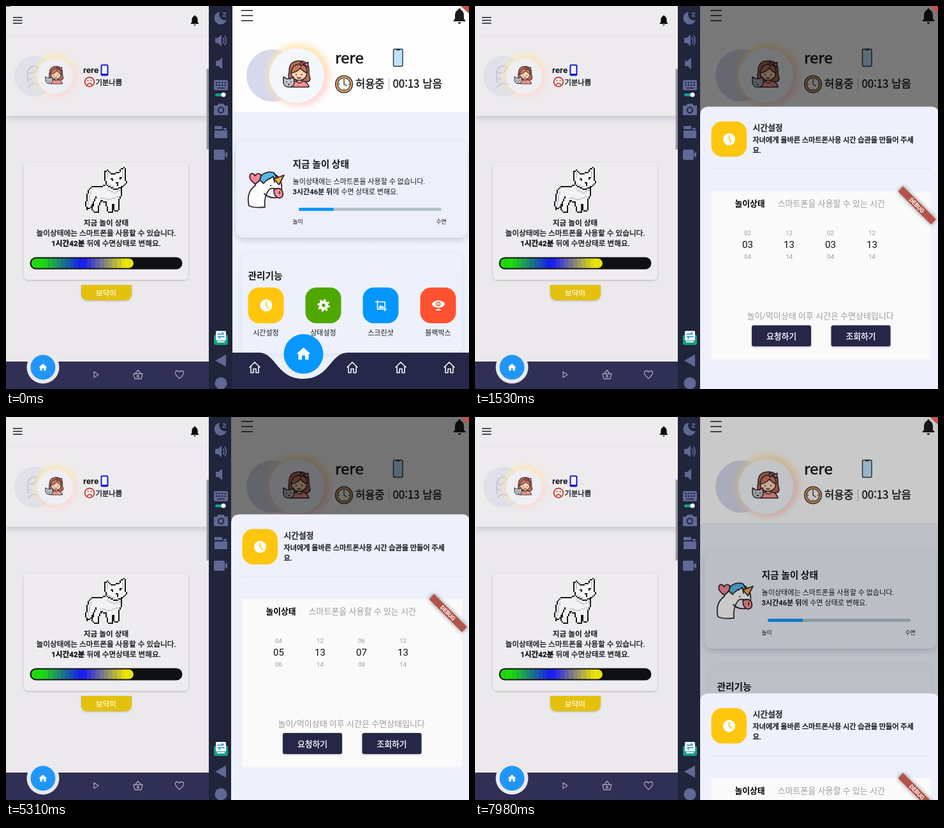
Write an HTML page that moves like this. It is 726 by 600 pixels and loops after 8 s.

```html
<!DOCTYPE html>
<html lang="ko">
<head>
<meta charset="utf-8">
<title>놀이 시간 설정</title>
<style>
html, body { margin: 0; width: 100%; height: 100%; overflow: hidden; background: #ebe9ec; }
svg { display: block; width: 726px; height: 600px; }
text { font-family: Roboto, "Noto Sans CJK KR", "Noto Sans CJK", sans-serif; fill: #16171b; }
.kr { font-family: "Noto Sans CJK KR", "Noto Sans CJK", sans-serif; }
.b { font-weight: 700; }
/* medium weight: regular with a thin outline */
.m { stroke: #16171b; stroke-width: .35; }
.c { text-anchor: middle; }
.w { fill: #fff; stroke: #fff; }
.g { fill: #9d9da1; }
.ln { fill: none; stroke-linecap: round; stroke-linejoin: round; }
.ink { stroke: #33252d; stroke-width: 1.5; stroke-linejoin: round; stroke-linecap: round; }
</style>
</head>
<body>
<svg viewBox="0 0 726 600">
<defs>
  <filter id="blur" x="-40%" y="-40%" width="180%" height="180%"><feGaussianBlur stdDeviation="5"/></filter>
  <filter id="soft" x="-20%" y="-20%" width="140%" height="150%"><feDropShadow dx="0" dy="4" stdDeviation="5" flood-color="#3c4468" flood-opacity=".22"/></filter>
  <filter id="faint" x="-20%" y="-20%" width="140%" height="150%"><feDropShadow dx="0" dy="1" stdDeviation="4" flood-color="#3c4468" flood-opacity=".1"/></filter>
  <filter id="thin" x="-20%" y="-20%" width="140%" height="150%"><feDropShadow dx="0" dy="1" stdDeviation="1.8" flood-opacity=".24"/></filter>
  <filter id="drop" x="-30%" y="-30%" width="160%" height="160%"><feDropShadow dx="0" dy="0" stdDeviation="3" flood-opacity=".5"/></filter>
  <linearGradient id="glow" x1=".2" y1="0" x2=".8" y2="1">
    <stop offset="0" stop-color="#ffe9ad"/><stop offset=".45" stop-color="#ffe3b4"/><stop offset="1" stop-color="#ffcdd8"/>
  </linearGradient>
  <linearGradient id="back" x1="0" x2="1"><stop offset="0" stop-color="#d3daee"/><stop offset="1" stop-color="#dcd5e2"/></linearGradient>
  <linearGradient id="body" x1="0" y1="0" x2="0" y2="1">
    <stop offset="0" stop-color="#e8ecf7"/><stop offset=".5" stop-color="#f1f4fc"/><stop offset="1" stop-color="#ebeffa"/>
  </linearGradient>
  <clipPath id="pane"><rect x="353" width="373" height="600"/></clipPath>
  <clipPath id="wheel"><rect x="400" y="188" width="260" height="56"/></clipPath>
  <clipPath id="meter"><rect x="39.5" y="395.5" width="160.5" height="15" rx="7.5"/></clipPath>

  <g id="girl" class="ink">
    <path d="M-12-5Q-13-22 4-22Q20-22 19-6Q19 0 21 6Q20 11 14 11H-8Q-15 8-12-5Z" fill="#b96a50"/>
    <path d="M-9 19Q-7 9 4 9Q17 9 19 19Z" fill="#f5928c"/>
    <path d="M0 6V11Q4 14 8 11V6Z" fill="#f7b48e"/>
    <ellipse cx="3.500" cy="-2" rx="12" ry="10.500" fill="#fdd3b4"/>
    <path d="M-9-3Q-8-16 4-17Q17-16 16-3Q9-6 6-11Q0-4-9-3Z" fill="#c4775c"/>
    <path d="M11-17L18-20L17-12ZM11-17L6-21L6-14Z" fill="#f2778a"/>
    <path d="M-1-1V0M8-1V0" fill="none"/><path d="M1 4Q3.500 6.500 6 4" fill="none"/>
    <path d="M-21 3L-16 6H-10L-5 3L-4 12Q-5 19-12 19Q-20 19-21 12Z" fill="#c0c4cc"/>
    <path d="M-16 11V11.500M-9 11V11.500M-13.500 14.500L-12.500 15.500L-11.500 14.500" fill="none"/>
  </g>
  <path id="ghost" class="ln" d="M-8 10Q-13-12 0-15Q10-15 9 0M-6-4Q2-3 6-10M-6 5H-4M-8 18Q-2 9 8 14" stroke="#77798a" stroke-width="2"/>
  <path id="bell" d="M0-11.500Q2-11.500 2-9Q7-7 7 0V5L9.500 8V9H-9.500V8L-7 5V0Q-7-7-2-9Q-2-11.500 0-11.500ZM-2.500 10.500H2.500Q2 13 0 13Q-2 13-2.500 10.500Z"/>
  <path id="home" d="M0-10L11 0H8V9H2.500V2.500H-2.500V9H-8V0H-11Z"/>
  <path id="roof" class="ln" d="M-8 0L0-8L8 0M-6-1.500V8.500H-2V2.500H2V8.500H6V-1.500" stroke="#fff" stroke-width="1.500"/>
  <g id="clock"><circle r="9.500" fill="#fff"/><path class="ln" d="M0-5.500V0L3.500 4" stroke="#ffc60f" stroke-width="1.700"/></g>
</defs>

<!-- child phone -->
<g>
  <rect width="318" height="600" fill="#ebe9ec"/>
  <rect width="318" height="172" fill="#edebee" filter="url(#soft)"/>
  <rect y="46" width="318" height="1" fill="#e5e3e6"/>
  <rect id="speck" x="1" width="6" height="1" fill="#333"/>
  <path d="M11 18H25.500M11 22.500H25.500M11 27H25.500" stroke="#1b1b1d" stroke-width="1.700"/>
  <use href="#bell" transform="translate(296 22) scale(.66)" fill="#0c0c0d"/>
  <circle cx="45" cy="110" r="32" fill="#dfe0e9"/>
  <use href="#ghost" transform="translate(43 109)" opacity=".25"/>
  <circle cx="78" cy="109" r="33" fill="url(#glow)" filter="url(#blur)" opacity=".8"/>
  <circle cx="77" cy="110" r="28" fill="#efeef2"/>
  <use href="#girl" transform="translate(76 109) scale(.66)"/>
  <text class="b" x="121" y="105" font-size="13.500">rere</text>
  <rect x="149.500" y="92.500" width="10" height="16" rx="1.500" fill="#f4f4ff" stroke="#1519cf" stroke-width="2"/>
  <path d="M149 107.500H160" stroke="#1519cf" stroke-width="3"/>
  <g class="ln" stroke="#c5301f" stroke-width="1.700"><circle cx="131" cy="119" r="7.400"/><path d="M127.500 123.500Q131 118.500 134.500 123.500M128.500 116.500V117M133.500 116.500V117"/></g>
  <text class="m" x="140.500" y="123.500" font-size="11.300">기분나쁨</text>
  <rect x="314.500" y="98" width="3.500" height="127" rx="1.500" fill="#97979d"/>

  <rect x="28" y="245" width="258" height="184" rx="7" fill="#eeecef" filter="url(#thin)"/>
  <g id="fox" shape-rendering="crispEdges"></g>
  <text class="c b" x="157" y="344" font-size="11.700">지금 놀이 상태</text>
  <text class="c m" x="157" y="360" font-size="11.700">놀이상태에는 스마트폰을 사용할 수 있습니다.</text>
  <text class="c m" x="157" y="376" font-size="11.700"><tspan class="b">1시간42분</tspan> 뒤에 수면상태로 변해요.</text>
  <rect x="37.500" y="393.500" width="239" height="19" rx="9.500" fill="#0e1012"/>
  <g id="bands" clip-path="url(#meter)"></g>
  <path d="M118 437H197V450Q197 461 186 461H129Q118 461 118 450Z" fill="#e3c10c" filter="url(#thin)"/>
  <text class="c m" x="157" y="453.500" font-size="11.600" style="fill:#fff6d0;stroke:#fff6d0">보닥이</text>

  <rect y="557" width="318" height="43" fill="#302f55"/>
  <circle cx="58" cy="566" r="25.500" fill="#ebe9ec"/>
  <circle cx="58" cy="566" r="19.500" fill="#2196f8"/>
  <use href="#home" transform="translate(58 566) scale(.58)" fill="#fff"/>
  <g class="ln" stroke="#a5a4b5" stroke-width="1.300">
    <path d="M138 573L145 577.500L138 582Z"/>
    <path d="M200 576H214L212 584H202ZM202.500 576L207 570.500L211.500 576"/><circle cx="207" cy="580" r="1.500"/>
    <path d="M272 583.500Q265.500 578 265.500 575Q265.500 571.500 268.800 571.500Q271 571.500 272 573.500Q273.500 571.500 275.500 571.500Q278.500 571.500 278.500 575Q278.500 578 272 583.500Z"/>
  </g>
</g>

<!-- tool strip -->
<g fill="#606894">
  <rect x="318" width="37" height="600" fill="#20253b"/>
  <path d="M335 9A10 10 0 1 0 346 22A9.500 9.500 0 0 1 335 9Z"/>
  <path class="ln" d="M340 11H345L340 16H345" stroke="#606894" stroke-width="1.300"/>
  <path d="M328 50H332L338 45V63L332 58H328ZM329 86H333L339 81V99L333 94H329Z"/>
  <path class="ln" d="M340.500 50Q343 54 340.500 58M343 47Q347.500 54 343 61" stroke="#606894" stroke-width="1.700"/>
  <rect x="326" y="116" width="22" height="16" rx="2.500"/>
  <path d="M329 120H346M329 124H346" stroke="#20253b" stroke-width="2" stroke-dasharray="2.500 2"/><path d="M331 128.500H343" stroke="#20253b" stroke-width="1.500"/>
  <rect x="328" y="137" width="15" height="4.500" rx="2" fill="#179e92"/><circle cx="341" cy="139" r="3.600" fill="#f2f5f6"/>
  <path d="M326 156H331L333 153H341L343 156H348V171H326Z"/><circle cx="337" cy="163" r="4.200" fill="none" stroke="#20253b" stroke-width="2"/>
  <path d="M327 188H339V193H327ZM327 195H347V207H327Z"/><path d="M341 191H346V194H341Z"/>
  <rect x="326" y="225" width="17" height="16" rx="2"/><path d="M343.500 231L347 228V238L343.500 235Z"/>
  <rect x="326" y="515" width="22" height="16" rx="3" fill="#139f82"/>
  <rect x="329" y="509" width="16" height="15" rx="1.500" fill="#f4fbff"/>
  <path class="ln" d="M332 514H341L339 511.500M342 518H333L335 520.500" stroke="#2389ce" stroke-width="1.600"/>
  <path d="M331 526H343" stroke="#f4fbff" stroke-width="2"/>
  <path d="M328 555.500L345 546V565Z"/><circle cx="337" cy="591" r="9.500"/>
</g>

<!-- parent phone -->
<g clip-path="url(#pane)">
  <rect x="353" width="373" height="600" fill="url(#body)"/>
  <rect x="353" width="373" height="166" fill="#fefefe"/>
  <path d="M369 7H387M369 15H387M369 23H387" stroke="#1d1d1f" stroke-width="1.600"/>
  <use href="#bell" transform="translate(711 15)" fill="#1c1c1f"/>
  <circle cx="418" cy="109" r="41" fill="url(#back)"/>
  <circle cx="459" cy="108" r="49" fill="url(#glow)" filter="url(#blur)" opacity=".9"/>
  <circle cx="456" cy="109" r="43" fill="#f4f8fd"/>
  <use href="#girl" transform="translate(456 108)"/>
  <text class="kr m" x="516" y="90" font-size="24" style="stroke-width:.7">rere</text>
  <rect x="607.500" y="67.500" width="14.500" height="27" rx="2" fill="#bfe4fa" stroke="#2b3340" stroke-width="1.400"/><path d="M612 68.500H618" stroke="#2b3340" stroke-width="2"/>
  <circle cx="530" cy="122.500" r="13.400" fill="#dca265" stroke="#2d2725" stroke-width="1.300"/>
  <circle cx="530" cy="122.500" r="9.800" fill="#f6f6f1" stroke="#2d2725" stroke-width="1.100"/>
  <path class="ln" d="M530 116V122.500L534 125M530 114.500V115M530 130V130.500M522 122.500H522.500M537.500 122.500H538" stroke="#2d2725" stroke-width="1.300"/>
  <text class="kr m" x="548" y="128" font-size="16.500">허용중</text>
  <path d="M600.500 113V132" stroke="#bcbcc0"/>
  <text class="kr m" x="606.500" y="128" font-size="16.800">00:13 남음</text>

  <rect x="360" y="211" width="364" height="152" rx="13" fill="#edf0fa" filter="url(#soft)"/>
  <g class="ink" style="stroke-width:1.8">
    <path d="M381 313Q376 292 391 281Q393 265 412 261Q435 264 432 291Q421 283 413 287Q404 298 406 315Q390 317 381 313Z" fill="#fff"/>
    <path d="M396 271Q405 257 420 261L426 271Q414 265 404 278Z" fill="#52b9e4"/>
    <path d="M420 271L436 265L428 280Z" fill="#f5ad45"/>
    <path d="M413 271L419 267L421 276" fill="#fff"/>
    <path d="M420 288Q428 283 433 289Q437 300 428 301Q420 299 420 288Z" fill="#f78e98"/>
    <path d="M405 294Q413 302 425 300" fill="none"/>
    <path d="M391 279Q382 273 382 267Q383 261 388 263L391 266Q394 260 399 264Q402 271 391 279Z" fill="#f9879a"/>
    <path d="M415 281V281.500M429 291V294" fill="none"/>
  </g>
  <text class="b" x="449.500" y="252.500" font-size="14.700">지금 놀이 상태</text>
  <text x="449.500" y="278.500" font-size="11.100">놀이상태에는 스마트폰을 사용할 수 없습니다.</text>
  <text x="449.500" y="294.500" font-size="11.100"><tspan class="b">3시간46분 뒤</tspan>에 수면 상태로 변해요.</text>
  <rect x="459" y="316" width="224" height="5" rx="2.500" fill="#b3c3ce"/>
  <rect x="459" y="316" width="55" height="5" rx="2.500" fill="#0c97fb"/>
  <text x="449.500" y="341" font-size="8.800">놀이</text><text x="674.500" y="341" font-size="8.800">수면</text>

  <rect x="370" y="388" width="345" height="156" rx="12" fill="#eef1fb" filter="url(#faint)"/>
  <text class="b" x="379.500" y="428" font-size="14.700">관리기능</text>
  <g id="tiles"></g>
  <use href="#clock" x="408" y="469"/>
  <circle cx="498" cy="469" r="5" fill="none" stroke="#fff" stroke-width="4.500"/>
  <circle cx="498" cy="469" r="8.300" fill="none" stroke="#fff" stroke-width="2.800" stroke-dasharray="3.200 3.320"/>
  <path d="M579 463.500H594V478M582.500 461V475H597" fill="none" stroke="#fff" stroke-width="1.600"/><path d="M584 473.500L587 468L589.500 471L591 469.500L593 473.500Z" fill="#fff"/>
  <ellipse cx="678" cy="467" rx="10" ry="5.800" fill="#fff"/><circle cx="678" cy="467" r="2.700" fill="none" stroke="#ff5130" stroke-width="1.500"/><path d="M672.500 477Q678 472 683.500 477Z" fill="#fff"/>

  <path d="M353 543H396C424 543 424 584 466 584C508 584 508 543 536 543H726V600H353Z" fill="#262849"/>
  <circle cx="466.500" cy="545" r="31" fill="#0797fe"/>
  <use href="#home" transform="translate(466.500 545)" fill="#fff"/>
  <use href="#roof" x="390" y="566"/><use href="#roof" x="543" y="566"/><use href="#roof" x="619" y="566"/><use href="#roof" x="695" y="566"/>
  <rect id="edge" x="353" width="2" height="600" fill="#20253b"/>

  <rect id="dim" x="353" width="373" height="600" opacity="0"/>

  <g id="sheet">
    <path d="M353 470V14Q353 0 367 0H715Q727 0 729 14V470Z" fill="#eef1fb"/>
    <rect x="370.500" y="23" width="55.500" height="55.500" rx="17" fill="#ffc60f"/>
    <use href="#clock" x="398.500" y="51"/>
    <text class="m" x="435.500" y="37.500" font-size="12.800" style="stroke-width:.5">시간설정</text>
    <text class="m" x="435.500" y="56.500" font-size="11.150" style="stroke-width:.5">자녀에게 올바른 스마트폰사용 시간 습관을 만들어 주세</text>
    <text class="m" x="435.500" y="72.500" font-size="11.150" style="stroke-width:.5">요.</text>
    <path d="M370.500 97.500H715" stroke="#dfe2ec"/>
    <rect x="370.500" y="132.500" width="344.500" height="263.500" fill="#fafafb"/>
    <text class="b" x="407.500" y="156.700" font-size="12.800" style="fill:#000">놀이상태</text>
    <text class="g" x="474.500" y="156.700" font-size="13">스마트폰을 사용할 수 있는 시간</text>
    <g id="wheels" clip-path="url(#wheel)"></g>
    <text class="g" x="426.500" y="332.700" font-size="13">놀이/먹이상태 이후 시간은 수면상태입니다</text>
    <g fill="#262849" filter="url(#thin)"><rect x="434" y="342.500" width="93" height="33" rx="3"/><rect x="558.500" y="342.500" width="93" height="33" rx="3"/></g>
    <text class="c m w" x="480.500" y="364" font-size="12.800">요청하기</text>
    <text class="c m w" x="605" y="364" font-size="12.800">조회하기</text>
    <path d="M671 124.500L723 176.500L715 184.500L663.500 133Z" fill="#b4534c" filter="url(#drop)"/>
    <text class="c b" font-size="9.200" transform="translate(693 154.500) rotate(45)" y="3.300" style="fill:#fff">DEBUG</text>
  </g>
  <path d="M713 0H726V12Z" fill="#c9514d"/>
</g>
</svg>
<script>
const $ = id => document.getElementById(id);
function add(parent, tag, attrs, label = '') {
  const el = document.createElementNS('http://www.w3.org/2000/svg', tag);
  for (const k in attrs) el.setAttribute(k, attrs[k]);
  el.textContent = label;
  return parent.appendChild(el);
}

// Pixel fox: lines on a grid of 2 px cells
const cell = (x, y, fill) => add($('fox'), 'rect', { x: 124 + x * 2, y: 252 + y * 2, width: 2, height: 2, fill });
const pairs = path => path.split(' ').map(s => s.split(',').map(Number));
function trace(path, fill = '#17181a') {
  const p = pairs(path);
  for (let i = 1; i < p.length; i++) {
    const [x, y] = p[i - 1], dx = p[i][0] - x, dy = p[i][1] - y;
    const n = Math.max(Math.abs(dx), Math.abs(dy));
    for (let k = 0; k <= n; k++) cell(Math.round(x + dx * k / n), Math.round(y + dy * k / n), fill);
  }
}
function solid(path, fill) {
  const points = pairs(path).map(([x, y]) => [125 + x * 2, 253 + y * 2]).join(' ');
  add($('fox'), 'polygon', { points, fill });
}
const grey = '#c9cad0';
const torso = '16,13 12,15 5,15 2,18 1,23 0,29 1,33 4,31 6,27 5,33 7,35 10,35 10,30 12,26 16,27 17,34 19,35 21,35 21,29 22,29 22,33 24,34 26,33 26,26 28,21 28,16';
const head = '15,9 15,3 17,2 20,5 26,4 28,1 30,0 31,1 31,9 32,12 30,14 27,16 24,17 20,16 16,13 15,9';
solid(torso, '#f3f2f5');
trace('4,19 2,29', grey);
trace('12,24 19,25 25,23', grey);
trace('17,17 22,20 27,18', grey);
trace(torso);
solid(head, '#f7f6f8');
trace('17,4 17,8', grey);
trace('29,3 29,7', grey);
trace('18,13 22,15', grey);
trace(head);
trace('20,9 21,9 21,10');
trace('27,8 28,8 27,9');
trace('24,12 25,12 25,14');
trace('8,23 7,26');

// Stepped meter colours: green, blue, yellow
const mix = (a, b, u) => a.map((v, i) => Math.round(v + (b[i] - v) * u));
const green = [31, 217, 15], blue = [20, 20, 255], yellow = [234, 228, 8];
for (let i = 0; i < 24; i++) {
  const u = i / 23;
  const rgb = u < .5 ? mix(green, blue, Math.max(0, (u - .1) / .4)) : mix(blue, yellow, Math.min(1, (u - .5) / .43));
  add($('bands'), 'rect', { x: 39.5 + i * 6.7, y: 395, width: 7, height: 16, fill: `rgb(${rgb})` });
}

[['시간설정', '#ffc60f'], ['상태설정', '#4fa800'], ['스크린샷', '#0397fd'], ['블랙박스', '#ff5130']].forEach(([label, fill], i) => {
  const x = 380 + i * 90;
  add($('tiles'), 'rect', { x: x - .5, y: 441, width: 56, height: 56, rx: 17, fill });
  add($('tiles'), 'text', { x: x + 27.5, y: 515.5, class: 'c', 'font-size': 11 }, label);
});

// Easing and tracks of [ms, value, ease]
function bezier(x1, y1, x2, y2) {
  const f = (a, b, s) => 3 * (1 - s) * (1 - s) * s * a + 3 * (1 - s) * s * s * b + s * s * s;
  return u => {
    let lo = 0, hi = 1;
    for (let i = 0; i < 20; i++) {
      const mid = (lo + hi) / 2;
      if (f(x1, x2, mid) < u) lo = mid; else hi = mid;
    }
    return f(y1, y2, lo);
  };
}
const linear = u => u;
const slide = bezier(0, 0, .2, 1);
const leave = u => 1 - slide(1 - u);
const spin = bezier(.25, .1, .25, 1);
function at(track, t) {
  const i = track.findIndex(k => k[0] > t);
  if (i < 0) return track[track.length - 1][1];
  if (!i) return track[0][1];
  const [t0, a] = track[i - 1], [t1, b, ease = linear] = track[i];
  return a + (b - a) * ease((t - t0) / (t1 - t0));
}

const LOOP = 8000;
const lift = [[0, 600], [1165, 600], [1593, 152.5, slide], [7836, 152.5], [8003, 600, leave]];
const shade = [[0, 0], [1090, 0], [1200, .175], [1350, .42], [1560, .54], [7836, .54], [7860, .53], [7980, .21], [8000, .15]];
const hours = [[0, 3], [2640, 3], [3420, 5, spin]];
const minutes = [[0, 13]];
const endHours = [[0, 3], [3450, 3], [3660, 4, spin], [4140, 4], [4410, 5, spin], [4620, 5], [4950, 7, spin]];

const wheels = [hours, minutes, endHours, minutes].map((track, i) => ({
  track,
  rows: [-2, -1, 0, 1, 2].map(() => add($('wheels'), 'text', { x: 427.5 + i * 65, class: 'c' }))
}));
function turn({ track, rows }, t) {
  const v = at(track, t), near = Math.round(v);
  rows.forEach((row, i) => {
    const n = near + i - 2, on = n === near;
    row.textContent = String(n).padStart(2, '0');
    row.setAttribute('y', 216.3 + (n - v) * 18.6 + (on ? 5.3 : 3.5));
    row.setAttribute('font-size', on ? 15 : 9.8);
    row.style.fill = on ? '#111' : '#9b9b9f';
  });
}

const start = performance.now();
function frame() {
  const t = (performance.now() - start) % LOOP;
  $('sheet').setAttribute('transform', `translate(0 ${at(lift, t).toFixed(2)})`);
  $('dim').setAttribute('opacity', at(shade, t));
  $('speck').setAttribute('opacity', t < 120 ? 1 : 0);
  $('edge').setAttribute('opacity', t < 345 ? 1 : 0);
  wheels.forEach(w => turn(w, t));
  requestAnimationFrame(frame);
}
frame();
</script>
</body>
</html>
```
